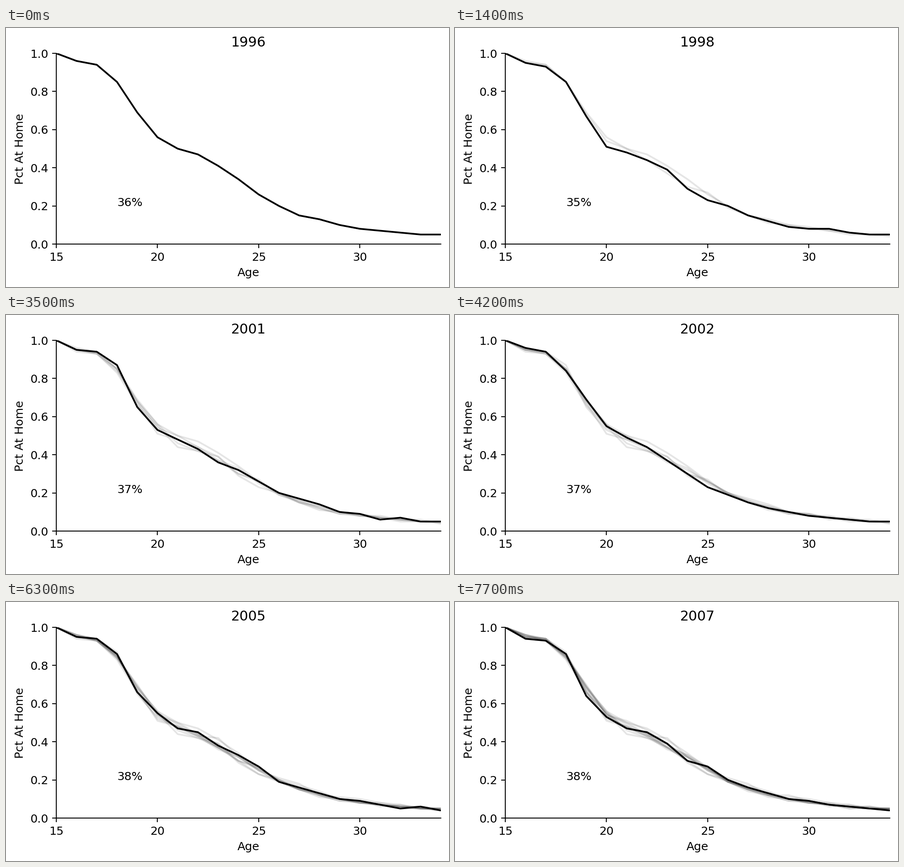
Animation, 978 px wide and 573 px high, one loop 8 s. Source, as a matplotlib script:

```python
import matplotlib.pyplot as plt
from matplotlib.animation import FuncAnimation
import numpy as np

W, H, DPI = 978, 573, 128
S = 182.6 / DPI          # scale from default point sizes
FIRST, AGE0 = 1996, 15
FRAMES, HOLD = 80, 7     # 100 ms steps, seven per year

# Typical share at home (percent) by age, 15 to 34
TYPICAL = [100, 95, 94, 85, 68, 54, 48, 44, 38, 32,
           26, 19, 15, 13, 10, 8, 7, 6, 5, 5]

# Ages 18 to 25 vary most from year to year
MIDDLE = [
    [85, 69, 56, 50, 47, 41, 34, 26],
    [85, 68, 54, 50, 44, 37, 30, 27],
    [85, 67, 51, 48, 44, 39, 29, 23],
    [83, 66, 55, 44, 42, 39, 30, 26],
    [84, 68, 56, 46, 42, 37, 33, 25],
    [87, 65, 53, 48, 43, 36, 32, 26],
    [84, 69, 55, 49, 44, 37, 30, 23],
    [85, 66, 52, 48, 43, 37, 32, 25],
    [84, 70, 54, 47, 43, 42, 32, 25],
    [86, 66, 55, 47, 45, 38, 33, 27],
    [86, 69, 54, 51, 46, 39, 32, 26],
    [86, 64, 53, 47, 45, 39, 30, 27],
]

# Small departures from typical at the other ages
NUDGES = [
    {16: 1, 26: 1},
    {28: -2, 30: 1, 32: -1, 34: -1},
    {17: -1, 26: 1, 28: -1, 29: -1, 31: 1},
    {16: -1, 17: -1, 26: 1, 27: 1, 28: -1, 29: -1, 30: 1},
    {17: -1, 27: 1, 33: 1, 34: -1},
    {26: 1, 27: 2, 28: 1, 30: 1, 31: -1, 32: 1},
    {16: 1, 28: -1},
    {16: 1, 17: -1, 33: 1},
    {16: 1, 17: -1, 26: 2, 27: 3, 28: -1, 29: 1, 30: 2, 31: 1, 32: 1, 34: -1},
    {27: 1, 30: 1, 32: -1, 33: 1, 34: -1},
    {16: -1, 17: -1, 27: -1, 28: -1, 29: 2, 30: 1},
    {16: -1, 17: -1, 26: 1, 27: 1, 30: 1, 34: -1},
]

OVERALL = [36, 35, 35, 35, 36, 37, 37, 37, 38, 38, 38, 38]


def curve(k):
    y = np.array(TYPICAL, float)
    y[3:11] = MIDDLE[k]
    for age, d in NUDGES[k].items():
        y[age - AGE0] += d
    return y / 100


plt.rcParams.update({
    "font.family": "DejaVu Sans",
    "font.size": 10 * S,
    "axes.titlesize": 12 * S,
    "axes.titlepad": 6 * S,
    "axes.labelpad": 4 * S,
    "axes.linewidth": 0.8 * S,
    "lines.linewidth": 1.5 * S,
    "axes.spines.top": False,
    "axes.spines.right": False,
})
for axis in ("xtick", "ytick"):
    plt.rcParams.update({
        f"{axis}.major.size": 3.5 * S,
        f"{axis}.major.width": 0.8 * S,
        f"{axis}.major.pad": 3.5 * S,
    })

fig = plt.figure(figsize=(W / DPI, H / DPI), dpi=DPI, facecolor="white")
ax = fig.add_axes([111 / W, 1 - 478 / H, 849 / W, 422 / H])
ax.set(xlim=(15, 34), ylim=(0, 1), xticks=[15, 20, 25, 30],
       xlabel="Age", ylabel="Pct At Home")

ages = np.arange(AGE0, AGE0 + len(TYPICAL))
lines = [ax.plot(ages, curve(k), color="black")[0] for k in range(len(MIDDLE))]
title = ax.set_title("")
label = ax.text(18, 0.2, "")


def update(i):
    now = min(i // HOLD, len(lines) - 1)
    for k, line in enumerate(lines):
        line.set_visible(k <= now)
        line.set_alpha(1 if k == now else 0.1)
    title.set_text(str(FIRST + now))
    label.set_text(f"{OVERALL[now]}%")
    return [*lines, title, label]


anim = FuncAnimation(fig, update, frames=FRAMES, interval=100,
                     repeat=True, repeat_delay=0, blit=False)
plt.show()
```
